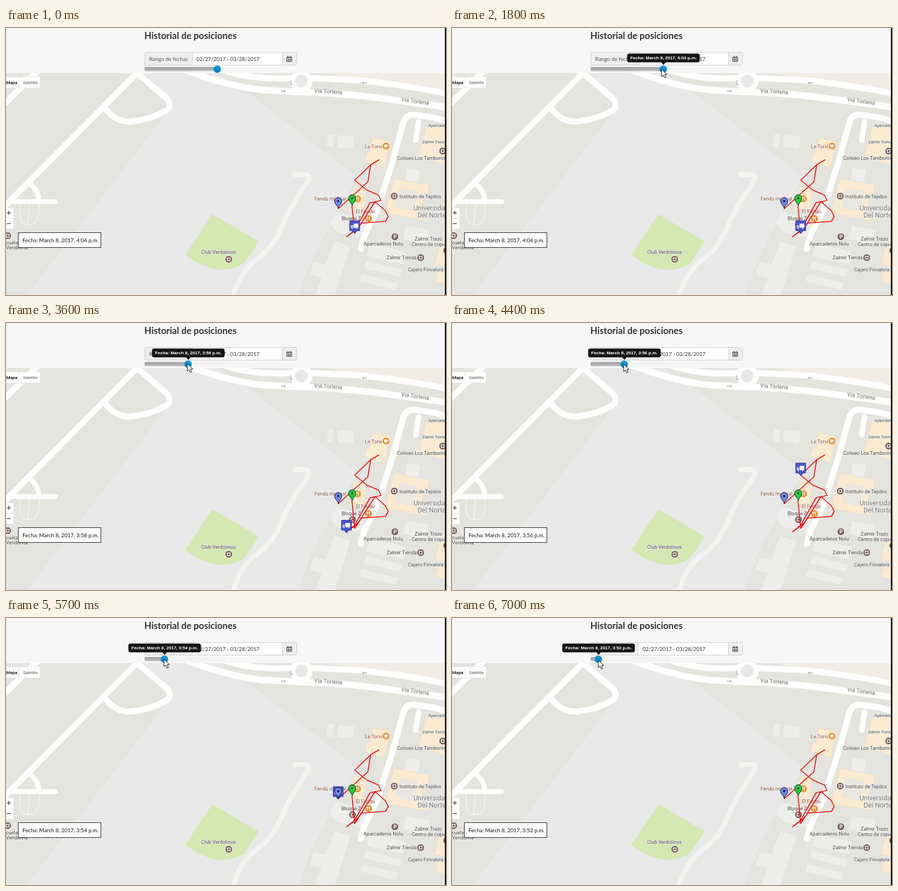
Write an HTML page that moves like this. It is 800 px wide and 486 px high and loops after 7.1 s.

```html
<!DOCTYPE html>
<html lang="es">
<head>
<meta charset="utf-8">
<title>Historial de posiciones</title>
<style>
html, body { margin: 0; width: 100%; height: 100%; overflow: hidden; background: #f7f7f7; }
svg { display: block; width: 800px; height: 486px; }
text { font: 9.8px Lato, sans-serif; fill: #333; }
.road { fill: none; stroke: #fff; stroke-width: 11; stroke-linejoin: round; stroke-linecap: round; }
.poi text { font: 9px Roboto, sans-serif; fill: #444; stroke: #f4f4f2; stroke-width: 1.6px; paint-order: stroke; }
.poi .food { fill: #8f4f3a; }
.poi .street { font-size: 10.3px; fill: #777; }
.poi .small { font-size: 7.5px; }
.poi .campus { font-size: 12.3px; fill: #777; text-anchor: middle; }
.ui text { font: 8px Roboto, sans-serif; fill: #565656; }
.bar { stroke: #ccc; }
.tip { font: bold 8.1px "Liberation Sans", Arial, sans-serif; fill: #fff; text-anchor: middle; }
</style>
</head>
<body>
<svg viewBox="0 0 800 486">
  <defs>
    <linearGradient id="track" x2="0" y2="1"><stop stop-color="#a0a0a0"/><stop offset="1" stop-color="#bcbcbc"/></linearGradient>
    <linearGradient id="knob" x2="0" y2="1"><stop stop-color="#149bdf"/><stop offset="1" stop-color="#0480be"/></linearGradient>
    <g id="place"><circle r="6.7" fill="#7b645d" stroke="#f4f0ec"/><rect x="-2.5" y="-2.5" width="5" height="5" fill="none" stroke="#fff" stroke-width="1.3"/></g>
    <g id="fork"><circle r="6.7" fill="#f28c28" stroke="#fbead5"/><path d="M-2-3.5V3.5M-3.3-3.5V-1H-.7V-3.5M2 3.5V-3.5Q.5-2 1 .5H2" fill="none" stroke="#fff"/></g>
    <g id="cup"><circle r="6.7" fill="#f28c28" stroke="#fbead5"/><path d="M-3-2.5H2V1Q-.5 3-3 1ZM-3 3.5H2" fill="#fff" stroke="#fff" stroke-width=".8"/><path d="M2-1.5H3.6V.2H2" fill="none" stroke="#fff" stroke-width=".8"/></g>
    <path id="pin" d="M0 0C-.7-6-6.5-8-6.5-14A6.5 6.5 0 0 1 6.5-14C6.5-8 .7-6 0 0Z" stroke="#111"/>
  </defs>

  <!-- map ground -->
  <path d="M0 82H800V486H0Z" fill="#e3e4de"/>
  <path d="M240 82H385L442 120 640 272 606 325 556 420 532 486H38L302 142Z" fill="#e8e8e8"/>
  <path d="M585 82H800V112L640 93Z" fill="#f1ede5"/>
  <path d="M375 339 459 388Q447 411 430 430 384 457 326 413Z" fill="#d4e8b2"/>

  <g fill="#ededec">
    <path d="M604 195 633 197 631 219 603 217ZM586 193 597 194 594 217 583 215ZM729 255 753 259 749 281 725 277Z"/>
    <path d="M597 388 626 397 598 486H562L574 455 553 449 559 426 581 431Z"/>
    <path d="M600 335 655 350 646 381 604 372 588 356ZM663 392 727 408 722 430 655 415Z"/>
    <path d="M655 424 720 440 716 453 651 437ZM647 448 712 464 708 477 643 461ZM728 360 770 368 764 394 722 384Z"/>
  </g>
  <g fill="#fbead0" stroke="#f0dfc5">
    <path d="M667 200 698 206 689 254 652 243 657 226 662 227Z"/>
    <path d="M764 180H800V250L750 235Z"/>
    <path d="M705 274 769 286 766 301 760 300 754 338 765 341 762 351 690 337Z"/>
    <path d="M632 288 655 292 649 338 626 331Z"/>
    <path d="M790 390H800V435L780 430ZM786 440 800 443V466L781 462Z"/>
  </g>
  <path d="M716 291 749 297 741 333 708 326Z" fill="#e8e7e1"/>

  <!-- roads -->
  <g class="road">
    <path d="M-5 140 60 76M242 78 -5 327M178 143Q198 173 229 170 265 166 293 149 303 141 292 128L238 82"/>
    <path d="M42 283Q58 294 60 314M8 316H90" stroke-width="9"/>
    <path d="M26 320V343Q28 357 40 358 57 359 59 340L61 320M43 320 39 357" stroke="#f5f5f3" stroke-width="1.5"/>
    <path d="M330 78Q410 108 470 113L522 116Q600 118 668 126L805 145" stroke-width="12"/>
    <path d="M400 78Q450 95 520 91M554 91 640 95 Q720 103 805 120"/>
    <circle cx="537" cy="96.5" r="16" stroke-width="9" fill="#e8e8e8"/>
    <path d="M805 171 778 163 742 158Q728 157 723 170L702 246 675 331 652 377 645 402"/>
    <path d="M750 171 745 204" stroke-width="10"/>
    <path d="M525 267H545Q554 268 549 279 517 324 502 360 486 400 456 421 426 442 412 490" stroke="#f3f3f2" stroke-width="9"/>
  </g>
  <path d="M500 115H508L506 113M508 115 506 117M656 100H648L650 98M648 100 650 102M518 95V103H521" fill="none" stroke="#888"/>

  <g class="poi">
    <text class="street" transform="translate(560 117) rotate(4)">Vía Torlena</text>
    <text class="street" transform="translate(718 133) rotate(8)">Vía Torlena</text>
    <text class="food" x="684" y="219" text-anchor="end">Le Torvi</text>
    <text class="food" x="561" y="314">Fendú mixi sal</text>
    <text class="food" x="636" y="337">El Fendú</text>
    <text x="610" y="350">Bloque Z</text>
    <text class="small" x="768" y="180">Aparcade</text>
    <text class="small" x="757" y="210">Zalmir Torre</text>
    <text x="711" y="240">Coliseo Los Tamborinos</text>
    <text x="715" y="310">Instituto de Tejidos</text>
    <text class="campus" x="773" y="332">Universidad</text>
    <text class="campus" x="774" y="345">Del Norte</text>
    <text x="650" y="396">Aparcaderos Nolu</text>
    <text x="743" y="387">Zalmir Trazo</text>
    <text x="733" y="397">- Centro de copiado</text>
    <text x="747" y="421" text-anchor="end">Zalmir Tienda</text>
    <text x="731" y="443">Cajero Finvalora</text>
    <text x="355" y="411">Club Verdolinos</text>
    <text x="0" y="394">cuela</text>
    <text x="0" y="403">Vendolina</text>
    <use href="#cup" x="691" y="215"/>
    <use href="#fork" x="639" y="311"/>
    <use href="#fork" x="659" y="347"/>
    <use href="#place" x="630" y="358"/>
    <use href="#place" x="706" y="306"/>
    <use href="#place" x="754" y="418"/>
    <use href="#place" x="794" y="224"/>
    <use href="#place" x="405" y="421"/>
    <use href="#place" x="3" y="378"/>
    <circle cx="707" cy="380" r="6.7" fill="#7b645d" stroke="#f4f0ec"/>
    <text x="704.5" y="383.3" style="fill:#fff;stroke:none;font-weight:bold">P</text>
    <circle cx="801" cy="405" r="6" fill="#7b645d"/>
  </g>

  <!-- route and markers -->
  <path d="M604 329 658 280 663 249 678 240 663 249 634 277 656 295 677 304 682 314 662 318 634 368 619 380 637 367 647 355 690 352 695 343 690 333 671 316 634 374 629 324" fill="none" stroke="#f00" stroke-width="1.6" stroke-linejoin="round"/>
  <g id="truck">
    <path d="M-9-21H9V-3H4L0 2-4-3H-9Z" fill="#4656cf" stroke="#2b2f9b"/>
    <path d="M-2-16H6.5V-8H-2ZM-7-13H-3V-8H-7Z" fill="#fff"/>
    <path d="M-6-12H-4V-10.5H-6Z" fill="#4656cf"/>
    <g fill="#fff" stroke="#2b2f9b" stroke-width=".8"><circle cx="-4.5" cy="-7.5" r="1.7"/><circle cx="3.5" cy="-7.5" r="1.7"/></g>
  </g>
  <use href="#pin" x="604" y="329" fill="#6c86ee"/><circle cx="604" cy="315" r="1.8"/>
  <use href="#pin" x="629.5" y="324" fill="#0bd83f"/><circle cx="629.5" cy="310" r="1.8"/>

  <!-- map controls -->
  <g class="ui">
    <path d="M0 89H62V109H0ZM0 327H14V366H0Z" fill="#fff" stroke="#ddd" stroke-width=".6"/>
    <path d="M23.5 89V109M1 346.5H12" stroke="#e6e6e6"/>
    <text x="0.5" y="101.5" style="fill:#000;font-weight:500">Mapa</text>
    <text x="31" y="101.5">Satélite</text>
    <path d="M1.5 336.5H8.5M5 333V340M1.5 356H8.5" stroke="#555" stroke-width="1.6"/>
  </g>
  <rect x="22.5" y="372.5" width="150" height="27" fill="#fff" stroke="#222"/>
  <text id="date" x="30" y="390" style="fill:#111"></text>

  <!-- header -->
  <path d="M0 0H800V82H0Z" fill="#f7f7f7"/>
  <text x="251.5" y="20" style="font-size:16.7px;font-weight:bold">Historial de posiciones</text>
  <rect class="bar" x="252.5" y="44.5" width="276" height="23" rx="2.5" fill="#eee"/>
  <path class="bar" d="M338.5 44.5H502.5V67.5H338.5Z" fill="#fff"/>
  <text x="260.5" y="59.5" style="fill:#555">Rango de fechas</text>
  <text x="346.5" y="59.5" style="font-size:9.55px">02/27/2017 - 03/28/2017</text>
  <path d="M510.5 53H519.5V61H510.5ZM510.5 54H519.5M510.5 58H519.5M513.5 55V61M516.5 55V61M512.5 51V54M517.5 51V54" fill="none" stroke="#444"/>
  <rect x="252" y="71" width="146" height="7.5" rx="2.5" fill="#f2f2f2"/>
  <rect id="fill" x="252" y="71" height="7.5" rx="2.5" fill="url(#track)"/>
  <circle id="handle" cy="75" r="6.8" fill="url(#knob)"/>
  <g id="tooltip">
    <path d="M-62 46.5H62Q66 46.5 66 50.5V58.5Q66 62.5 62 62.5H4L0 67-4 62.5H-62Q-66 62.5-66 58.5V50.5Q-66 46.5-62 46.5Z" fill="#161616"/>
    <text id="tipDate" class="tip" y="57.3"></text>
  </g>
  <path d="M798 0H800V486H798Z"/>
  <path id="beam" d="M-2.5-6Q0-6 0-4.5V4.5Q0 6-2.5 6M2.5-6Q0-6 0-4.5M0 4.5Q0 6 2.5 6" fill="none" stroke="#222"/>
  <path id="arrow" d="M0 0V13.5L3.2 10.6 5.5 15.8 8 14.7 5.8 9.7H10Z" fill="#fff" stroke="#111"/>
</svg>
<script>
const LOOP = 7100, HOVER = 1500;
const el = id => document.getElementById(id);

// start ms, clock, slider x, truck x, truck y
const stops = [
  [0, '4:04', 384, 634, 372],
  [2500, '4:03', 375, 647, 355],
  [2700, '4:02', 366, 671, 316],
  [2900, '4:01', 357, 662, 318],
  [3100, '4:00', 349, 647, 345],
  [3300, '3:59', 340, 634, 368],
  [3500, '3:58', 331, 619, 380],
  [4000, '3:57', 322, 677, 304],
  [4300, '3:56', 313, 634, 276],
  [4900, '3:55', 301, 663, 249],
  [5500, '3:54', 288, 604, 328],
  [6200, '3:53', 277],
  [6700, '3:52', 266]
];
// ms, x, y
const pointer = [
  [500, 290, 61], [1100, 290, 61], [HOVER, 381, 75], [2400, 381, 75],
  [3500, 332, 74], [4300, 314, 75], [5600, 289, 75], [6900, 266, 77], [LOOP, 266, 77]
];

function pointerAt(t) {
  const i = pointer.findIndex(p => p[0] > t);
  const [t0, x0, y0] = pointer[i - 1], [t1, x1, y1] = pointer[i];
  const k = (t - t0) / (t1 - t0);
  return [x0 + (x1 - x0) * k, y0 + (y1 - y0) * k];
}

function place(id, x, y, visible = true) {
  el(id).setAttribute('transform', `translate(${x} ${y})`);
  el(id).style.display = visible ? '' : 'none';
}

function draw(t) {
  const [, clock, x, truckX, truckY] = stops.filter(s => s[0] <= t).pop();
  el('date').textContent = el('tipDate').textContent = `Fecha: March 8, 2017, ${clock} p.m.`;
  el('fill').setAttribute('width', x - 252);
  el('handle').setAttribute('cx', x);
  place('tooltip', x + 0.5, 0, t >= HOVER);
  place('truck', truckX ?? 0, truckY ?? 0, truckX !== undefined);

  const shown = t >= pointer[0][0];
  const [px, py] = shown ? pointerAt(t) : [0, 0];
  const overText = px < 338 && t < HOVER;
  place('beam', px, py, shown && overText);
  place('arrow', px, py, shown && !overText);
}

const start = performance.now();
function tick() {
  draw((performance.now() - start) % LOOP);
  requestAnimationFrame(tick);
}
tick();
</script>
</body>
</html>
```
